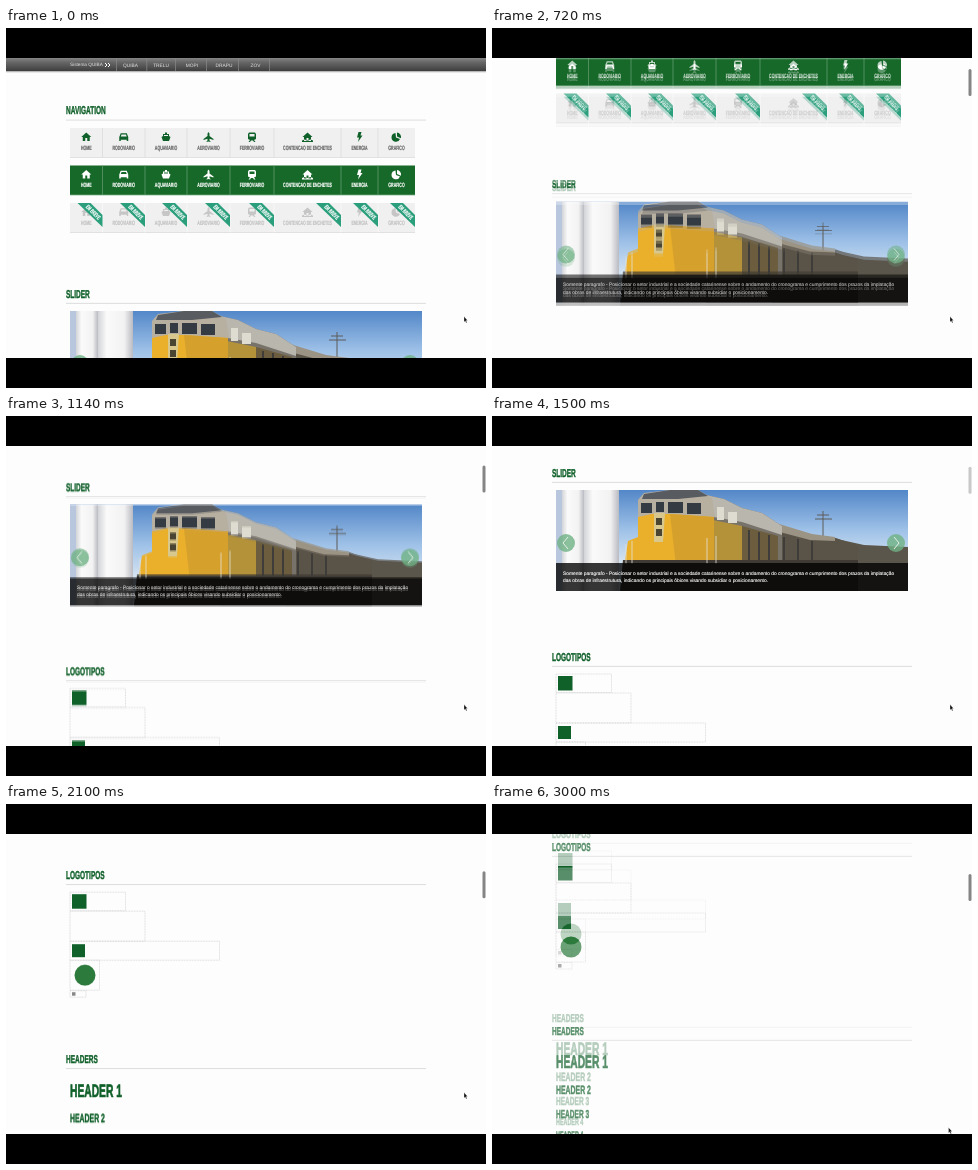
Recreate the animation shown at these times as an HTML page. Size 480 by 360 pixels, loop 3.06 s.

```html
<!DOCTYPE html>
<html lang="pt">
<head>
<meta charset="utf-8">
<style>
html, body { margin: 0; width: 100%; height: 100%; overflow: hidden; background: #000; }
svg { display: block; width: 100%; height: 100%; }
text { font-family: "Liberation Sans", Arial, sans-serif; text-rendering: geometricPrecision; }
</style>
</head>
<body>
<svg viewBox="0 0 480 360">
  <defs>
    <linearGradient id="bar" x2="0" y2="1">
      <stop stop-color="#858585"/><stop offset=".3" stop-color="#686868"/><stop offset="1" stop-color="#3c3c3c"/>
    </linearGradient>
    <linearGradient id="sky" x2="0" y2="1">
      <stop stop-color="#5387c8"/><stop offset=".4" stop-color="#9fc2e8"/><stop offset=".7" stop-color="#d3e2f1"/>
    </linearGradient>
    <linearGradient id="silo">
      <stop stop-color="#d3d4d8"/><stop offset=".25" stop-color="#fafafa"/>
      <stop offset=".75" stop-color="#f3f2f2"/><stop offset="1" stop-color="#b9bbc2"/>
    </linearGradient>
    <clipPath id="photo"><path d="M64 74H416V175H64Z"/></clipPath>
  </defs>
  <g id="page"></g>
  <g id="ghost" opacity=".3"></g>
  <rect id="thumb" x="476.5" width="3" height="27" rx="1.5" fill="#858585"/>
  <path id="cursor" d="M0 0V5.5L1.2 4.4 2.2 6.4 3 6 2.1 4H3.6Z" fill="#111" stroke="#fff" stroke-width=".3"/>
  <path d="M0 0H480V30H0ZM0 330H480V360H0Z"/>
</svg>
<script>
const $ = id => document.getElementById(id);
const GREEN = '#10602a', LOOP = 3060, STEP = 60;

const rect = (x, y, w, h, fill, extra = '') =>
  `<rect x="${x}" y="${y}" width="${w}" height="${h}" fill="${fill}" ${extra}/>`;
const path = (d, fill, extra = '') => `<path d="${d}" fill="${fill}" ${extra}/>`;
const line = (d, color, width) => path(d, 'none', `stroke="${color}" stroke-width="${width}"`);
const text = (s, x, cy, size, fill, extra = '') =>
  `<text x="${x}" y="${cy + size * .36}" font-size="${size}" fill="${fill}" ${extra}>${s}</text>`;
// Narrow bold capitals, centred vertically on cy
const narrow = (s, x, cy, size, fill, anchor = 'start') =>
  `<g transform="translate(${x} ${cy}) scale(.57 1)">` +
  text(s, 0, 0, size, fill, `font-weight="700" text-anchor="${anchor}" stroke="${fill}" stroke-width="${size * .04}"`) + '</g>';
const at = (x, y, body) => `<g transform="translate(${x} ${y})">${body}</g>`;

const HOUSE = 'M-5 0L0-4.5 5 0H3.5V4H1V1H-1V4H-3.5V0Z';
const cells = [
  ['HOME', 64, HOUSE],
  ['RODOVIARIO', 96.5, 'M-4.5 0L-3-3.7H3L4.5 0V4H3V2.8H-3V4H-4.5ZM-3-.5H3L2.2-2.6H-2.2Z'],
  ['AQUAVIARIO', 139, 'M-1-4.5H1V-3H3V-1L4.5 0 3 4H-3L-4.5 0-3-1V-3H-1ZM-2-2V-1H2V-2Z'],
  ['AEROVIARIO', 181, 'M0-5L1-3.5V-1L5 2V3L1 1.8V3.5L2 4.5V5L0 4.5-2 5V4.5L-1 3.5V1.8L-5 3V2L-1-1V-3.5Z'],
  ['FERROVIARIO', 224, 'M-3-4.5H3L4-3V2L2 3 3.5 5H2L1 3.5H-1L-2 5H-3.5L-2 3-4 2V-3ZM-2.5-3V-.5H2.5V-3Z'],
  ['CONTENCAO DE ENCHETES', 268, HOUSE + 'M-5.5 3.5L-3 2.6 0 3.6 3 2.6 5.5 3.5V5H-5.5Z'],
  ['ENERGIA', 335, 'M-1-5H2L1-1.5H3L-1.5 5-.5.5H-2.5Z'],
  ['GRAFICO', 372, 'M-1-4A4.4 4.4 0 1 0 3.5 2L-.5.5ZM.5-4.6A4.6 4.6 0 0 1 4.4 1.2L.5-.6Z']
];
const rightOf = i => i < 7 ? cells[i + 1][1] : 409;

function navRow(y, bg, icon, label, edge, soon) {
  let out = rect(64, y, 345, 29.5, bg) + rect(64, y + 29, 345, .8, edge);
  cells.forEach(([name, x, shape], i) => {
    const r = rightOf(i), mid = (x + r) / 2;
    out += at(mid, y + 9, path(shape, icon, 'fill-rule="evenodd"'));
    out += narrow(name, mid, y + 19.7, 6.2, label, 'middle');
    if (i < 7) out += rect(r - .4, y, .8, 29.5, soon ? '#fafafa' : edge);
    if (soon) out += at(r, y, path('M-25 0H-12L0 12V24Z', '#2b9f7c') +
      `<g transform="translate(-9.2 9) rotate(45)">${narrow('EM BREVE', 0, 0, 6, '#fff', 'middle')}</g>`);
  });
  return out;
}

function topBar() {
  let out = rect(0, 30, 480, 13.5, 'url(#bar)') + rect(0, 43.5, 480, 1, '#d5d5d5');
  out += text('Sistema QUIBA', 64, 36.8, 4.7, '#e4e4e4');
  out += line('M99 35L101 37 99 39M102 35L104 37 102 39', '#fff', 1);
  [['QUIBA', 124.5], ['TRELU', 155], ['MOPI', 186], ['DRAPU', 218], ['ZOV', 249.5]].forEach(([s, x]) =>
    out += text(s, x, 37.2, 4.8, '#e4e4e4', 'text-anchor="middle"'));
  [110, 140.5, 169, 200, 232, 263].forEach(x => out += rect(x, 30, .7, 13, '#8a8a8a'));
  return out;
}

function photo() {
  return '<g clip-path="url(#photo)">' +
    rect(64, 74, 352, 101, 'url(#sky)') +
    rect(64, 74, 6, 101, '#b9c7de') + rect(70, 74, 22, 101, 'url(#silo)') + rect(92, 74, 35, 101, 'url(#silo)') +
    // far wagons, trees and pole
    path('M300 120L345 123 372 129 416 131V175H290Z', '#5b564c') +
    line('M331 95V125M323 103H340M325 99H337', '#5d5a58', 1) +
    path('M284 108L318 119 344 122 366 130V175H280Z', '#5a5348') +
    path('M284 107L320 118 343 121V125L318 124 284 115Z', '#9b9384') +
    // long hood
    path('M214 79L232 83 250 92 270 97 290 110V175H214Z', '#77736a') +
    path('M214 79L232 83 250 92 270 97 290 110V119L250 106 216 100Z', '#b9b6ae') +
    path('M216 103L250 110V150H216Z', '#b4923a') +
    path('M250 110L286 120V148H250Z', '#6b5d3d') +
    line('M257 114V150M267 116V150M277 119V150M292 121V150M306 123V150M320 125V150', '#3f3d39', 2) +
    // cab
    path('M146 84L152 77 178 74H206L220 82 223 101 146 102Z', '#b7afa0') +
    path('M152 78L178 74H206L216 80 186 83 150 83Z', '#585b60') +
    path('M149 87H160V97H149ZM164 86H172V96H164ZM176 86H191V97H176ZM195 87H209V98H195Z', '#353b43') +
    path('M146 101L160 98H178L222 101V150H132L136 125 146 121Z', '#eab02c') +
    path('M178 98L222 101V150H184Z', '#d6a02c') +
    path('M162 97H173L171 126H162Z', '#d9c88e') +
    path('M164 102H170V109H164ZM164 113H170V120H164Z', '#4a4433') +
    path('M225 91H232V104H225ZM236 96H245V107H236Z', '#dedbd0') +
    path('M131 144H366V175H128Z', '#3f3b34') +
    line('M134 128V148M140 125V148M215 122V148M224 120V148', '#e6e3d6', .8) +
    '</g>';
}

function slider() {
  const arrow = (x, d) => `<circle cx="${x}" cy="127" r="9" fill="#6fb184" opacity=".8"/>` +
    line(`M${x + 2 * d} 121L${x - 3 * d} 127 ${x + 2 * d} 133`, '#eef6f0', .9);
  const caption = (s, cy) => text(s, 71, cy, 4.86, '#fff', 'stroke="#fff" stroke-width=".12"');
  return at(0, 209, photo() +
    rect(64, 147, 352, 28, '#000', 'opacity=".78"') +
    caption('Somente paragrafo - Posicionar o setor industrial e a sociedade catarinense sobre o andamento do cronograma e cumprimento dos prazos da implatação', 157) +
    caption('das obras de infraestrutura, indicando os principais óbices visando subsidiar o posicionamento.', 164.3) +
    arrow(74, 1) + arrow(404, -1));
}

function logos() {
  const box = (y, w, h) => rect(64, y, w, h, 'none', 'stroke="#ccc" stroke-width=".6" stroke-dasharray="1 .6"');
  return at(0, 380,
    box(87, 55.5, 18.5) + box(106, 75, 30) + box(136, 149.5, 19) + box(155, 29.5, 30) + box(185.5, 16, 6.5) +
    rect(66, 89, 14.5, 14.5, GREEN) + rect(66, 139, 13, 13, GREEN) +
    '<circle cx="79" cy="170" r="10.5" fill="#2c7a3c"/>' + rect(66, 187, 3.5, 3.5, '#888'));
}

function buildPage() {
  const title = (s, cy) => narrow(s, 60, cy, 11.4, GREEN) + rect(60, cy + 9.5, 360, .7, '#cfcfcf');
  return rect(0, 0, 480, 900, '#fdfdfd') + topBar() +
    title('NAVIGATION', 82.2) + title('SLIDER', 265.4) + title('LOGOTIPOS', 449.4) + title('HEADERS', 633.4) +
    navRow(100, '#f0f0f0', GREEN, '#666', '#dcdcdc') +
    navRow(137.5, '#17692a', '#fff', '#fff', '#5f9a6b') +
    navRow(175, '#f0f0f0', '#c6c6c6', '#c2c2c2', '#dcdcdc', true) +
    slider() + logos() +
    narrow('HEADER 1', 64, 665, 18, GREEN) + narrow('HEADER 2', 64, 693, 12.1, GREEN) +
    narrow('HEADER 3', 64, 716.7, 11.5, GREEN) + narrow('HEADER 4', 64, 737.7, 9.5, GREEN);
}

// Scroll offset over time, joined by a monotone cubic
const keys = [[0, 0], [300, 0], [420, 17], [720, 109.5], [960, 167], [1260, 205], [1440, 209], [1680, 209],
  [1860, 300], [2040, 376], [2160, 380], [2820, 380], [2940, 394], [3000, 407], [3060, 420]];
const secant = i => keys[i + 1] && keys[i] ? (keys[i + 1][1] - keys[i][1]) / (keys[i + 1][0] - keys[i][0]) : 0;
const slope = i => {
  const a = secant(i - 1), b = secant(i);
  return a * b > 0 ? 2 * a * b / (a + b) : 0;
};
const clamp = (x, lo, hi) => Math.min(Math.max(x, lo), hi);
function scrollAt(time) {
  const t = clamp(time, 0, LOOP);
  const i = Math.max(0, keys.findIndex(k => k[0] >= t) - 1);
  const [t0, a] = keys[i], [t1, b] = keys[i + 1], d = t1 - t0, u = (t - t0) / d, v = 1 - u;
  return v * v * (1 + 2 * u) * a + u * u * (3 - 2 * u) * b + d * u * v * (v * slope(i) - u * slope(i + 1));
}

$('page').innerHTML = $('ghost').innerHTML = buildPage();
const move = (id, x, y) => $(id).setAttribute('transform', `translate(${x} ${y})`);

function frame() {
  const t = Math.floor(performance.now() % LOOP / STEP) * STEP;
  const s = scrollAt(t);
  move('page', 0, -s);
  move('ghost', 0, -scrollAt(t < 2700 ? t - 12 : t + STEP));
  move('thumb', 0, 30.5 + s * .097);
  // the thumb fades once scrolling comes to rest
  $('thumb').style.opacity = clamp((s - scrollAt(t - 200)) / 6, s ? .3 : 0, 1);
  const u = clamp((t - 2400) / 300, 0, 1), e = u * u * (3 - 2 * u);
  move('cursor', 458 - 1.5 * e, 288.5 + 35 * e);
  requestAnimationFrame(frame);
}
frame();
</script>
</body>
</html>
```
